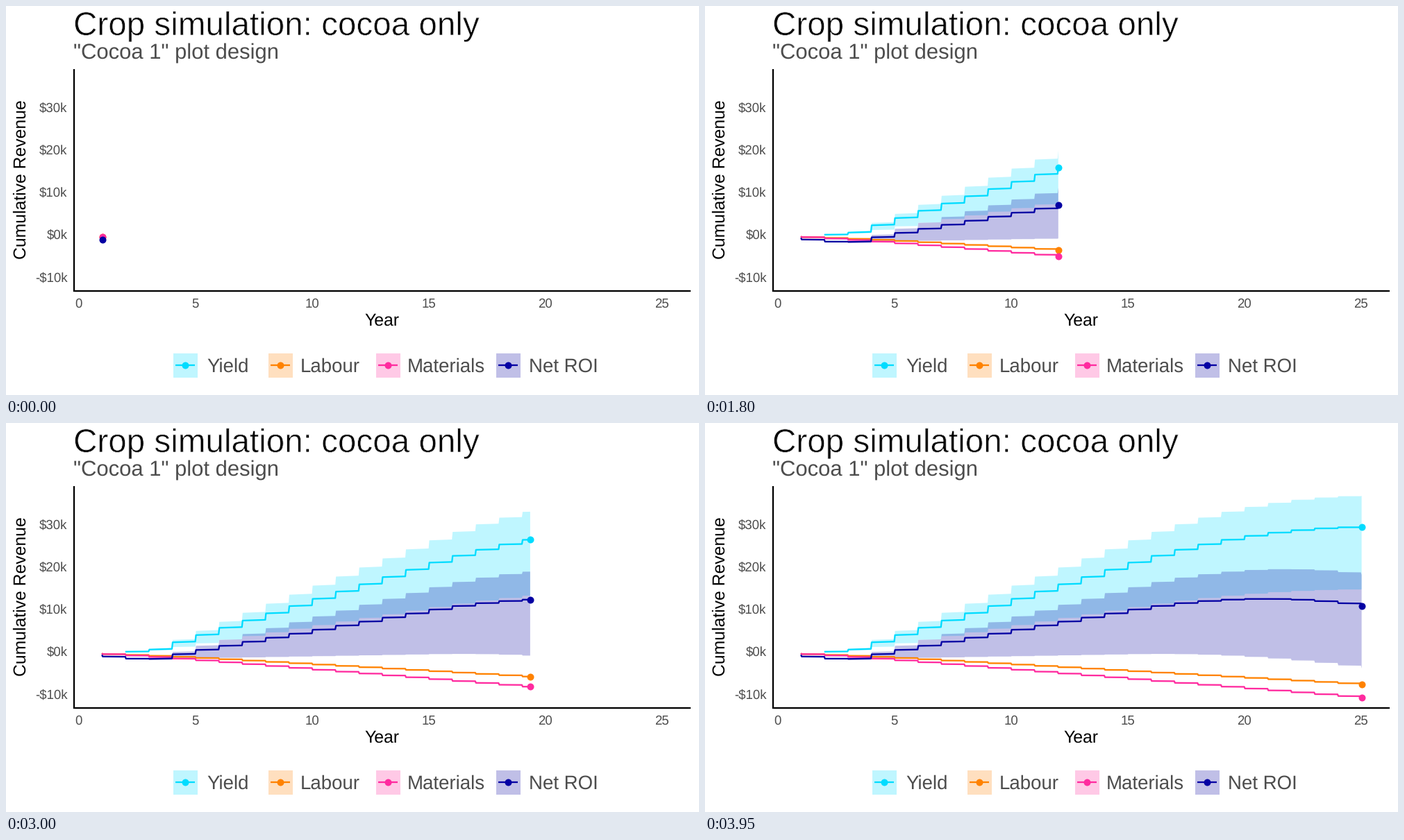
Recreate the animation shown at these times as a matplotlib script. Size 998 px wide and 561 px high, loop 5 s.

```python
import matplotlib.pyplot as plt
import numpy as np
from matplotlib import patheffects
from matplotlib.animation import FuncAnimation
from matplotlib.patches import Polygon, Rectangle

W, H, DPI = 998, 561, 64
PT = 72 / DPI                       # points per pixel
STEPS, FRAMES, INTERVAL = 79, 100, 50
JUMP = 0.03                         # width of each yearly step, in years
GREY = "#4d4d4d"
COLORS = {"Yield": "#00dcff", "Labour": "#ff8200",
          "Materials": "#ff2b9f", "Net ROI": "#0400a3"}

plt.rcParams["font.family"] = "Liberation Sans"
plt.rcParams["text.hinting"] = "none"


def px(year):
    return 104.6 + 33.6 * year


def py(value):
    return 329.8 - 6.125 * value


# --- model: yearly totals in $k, years 0 to 25 ---
years = np.arange(26)


def total(start, first, knots, rates):
    """Sum yearly rates, interpolated between knots, from year `first` on."""
    rate = np.where(years > first, np.interp(years, knots, rates), 0)
    return start + np.cumsum(rate)


def cost(knots, rates):
    out = -total(0.57, 1, knots, rates)
    out[0] = 0.6 * out[1]
    return out


def stepped(totals):
    """Two values per year: just before and just after the yearly jump."""
    before = totals[:-1] + 0.1 * np.diff(totals)
    return np.column_stack([before, totals[1:]]).ravel()


crop = total(0, 2, [3, 4, 15, 16, 25], [0.5, 1.706, 1.706, 1.59, 0.09])
labour = cost([2, 6, 7], [0.18, 0.3, 0.314])
materials = cost([2, 6], [0.32, 0.4425])
spent = labour + materials

times = np.column_stack([years[1:], years[1:] + JUMP]).ravel()
lines = {"Yield": stepped(crop), "Labour": stepped(labour),
         "Materials": stepped(materials), "Net ROI": stepped(crop + spent)}
bands = {"Yield": (stepped(0.5 * crop), stepped(1.25 * crop)),
         "Net ROI": (stepped(0.5 * crop + spent), stepped(1.25 * crop + spent))}
begin = {"Yield": 2}

# Each data time snaps to a step; the steps between are interpolated.
snapped = np.round((times - times[0]) / (times[-1] - times[0]) * STEPS)
keys = dict(zip(snapped, times))


def time_at(frame):
    return np.interp(min(frame, STEPS), list(keys), list(keys.values()))


def reveal(values, start, now):
    shown = (times >= start) & (times < now)
    x = np.append(times[shown], now)
    y = np.append(values[shown], np.interp(now, times, values))
    return px(x), py(y)


# --- stage ---
fig = plt.figure(figsize=(W / DPI, H / DPI), dpi=DPI, facecolor="white")
ax = fig.add_axes([0, 0, 1, 1])
ax.set_xlim(0, W)
ax.set_ylim(H, 0)
ax.axis("off")


def label(x, y, text, size, color=GREY, ha="left", **kw):
    return ax.text(x, y, text, fontsize=size * PT, color=color, ha=ha,
                   va="baseline", **kw)


def stroke(x, y, color, width=2.3, **kw):
    return ax.plot(x, y, color=color, lw=width * PT, solid_capstyle="butt",
                   solid_joinstyle="round", **kw)[0]


def dot(x, y, color, **kw):
    return ax.plot(x, y, "o", color=color, ms=10 * PT, mew=0, **kw)[0]


title = label(97, 42, "Crop simulation: cocoa only", 47.6, "black")
title.set_path_effects([patheffects.Normal(),
                        patheffects.Stroke(linewidth=0.8 * PT,
                                           foreground="white")])
label(97.5, 76, '"Cocoa 1" plot design', 31, GREY)
label(28.5, 250.5, "Cumulative Revenue", 24.8, "black", "center",
      rotation=90, rotation_mode="anchor")
label(541.5, 460.5, "Year", 24.8, "black", "center")

for k in range(-10, 31, 10):
    text = f"-${-k}k" if k < 0 else f"${k}k"
    label(88.5, py(k) + 6.3, text, 18.6, ha="right")
for year in range(0, 26, 5):
    label(px(year), 435, str(year), 18.6, ha="center")

stroke([98.2, 98.2], [91, 412.2], "black", zorder=1)
stroke([97, 986], [411, 411], "black", zorder=1)

for (name, color), x, tx in zip(COLORS.items(), (241, 378, 533, 706),
                                (289, 423.5, 578, 753)):
    ax.add_patch(Rectangle((x, 501), 35, 35, fc=color, alpha=0.25, lw=0))
    stroke([x + 3.5, x + 31.5], [518, 518], color)
    dot([x + 17.5], [518], color)
    label(tx, 527.5, name, 27.6)

ribbons = {}
for name in bands:
    ribbons[name] = Polygon(np.zeros((3, 2)), fc=COLORS[name], alpha=0.25,
                            lw=0, zorder=2)
    ax.add_patch(ribbons[name])
paths = {n: stroke([], [], c, zorder=3) for n, c in COLORS.items()}
dots = {n: dot([], [], c, zorder=4) for n, c in COLORS.items()}


def draw(frame):
    now = time_at(frame)
    for name, values in lines.items():
        start = begin.get(name, 1)
        parts = [paths[name], dots[name]]
        if name in ribbons:
            parts.append(ribbons[name])
        for part in parts:
            part.set_visible(now >= start)
        if now < start:
            continue
        x, y = reveal(values, start, now)
        paths[name].set_data(x, y)
        dots[name].set_data(x[-1:], y[-1:])
        if name in ribbons:
            low, high = (reveal(v, start, now)[1] for v in bands[name])
            ribbons[name].set_xy(np.column_stack([
                np.concatenate([x, x[::-1]]),
                np.concatenate([low, high[::-1]])]))
    return [*ribbons.values(), *paths.values(), *dots.values()]


anim = FuncAnimation(fig, draw, frames=FRAMES, init_func=lambda: draw(0),
                     interval=INTERVAL, repeat=True, repeat_delay=0,
                     blit=False)
plt.show()
```
